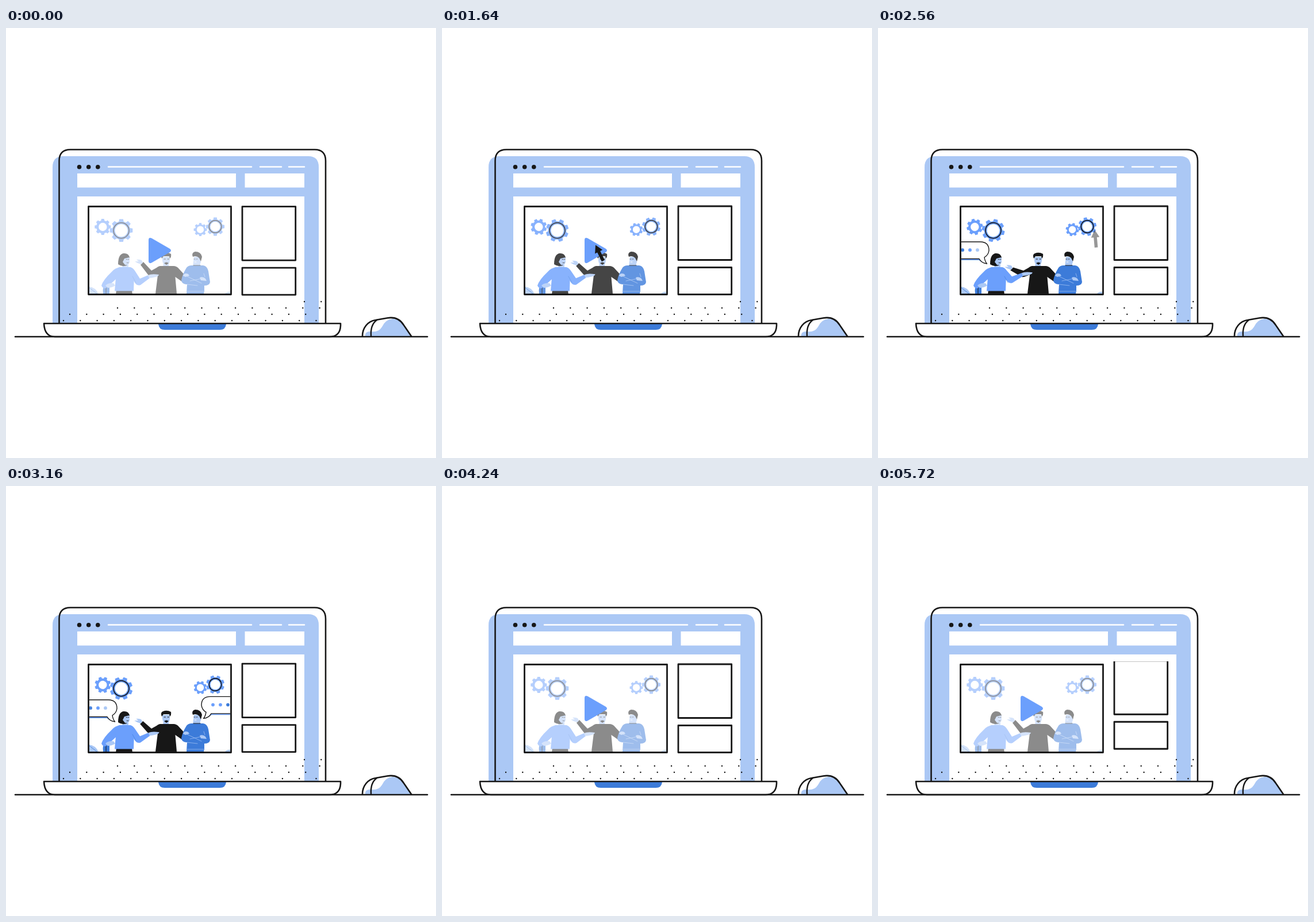
An HTML page with a canvas for the animation above (5.76 s loop, 748 by 748 pixels).

```html
<!DOCTYPE html>
<html lang="en">
<head>
<meta charset="utf-8">
<title>Laptop video</title>
<style>
  html, body { margin: 0; width: 100%; height: 100%; overflow: hidden; background: #fff; }
  canvas { display: block; width: 748px; height: 748px; }
</style>
</head>
<body>
<canvas id="stage" width="748" height="748"></canvas>
<script>
const ctx = document.getElementById('stage').getContext('2d');
const LOOP = 5760, STEP = 40;
const INK = '#171717', PALE = '#abc8f5', BLUE = '#6b9ffc', DEEP = '#3c7bd9', WHITE = '#fff';

const clamp = v => Math.min(1, Math.max(0, v));
const ramp = (t, a, b) => clamp((t - a) / (b - a));
const sine = u => (1 - Math.cos(Math.PI * u)) / 2;
const ease = (t, a, b) => sine(ramp(t, a, b));
const mix = (a, b, u) => a + (b - a) * u;

function fill(color, d) {
  ctx.fillStyle = color;
  ctx.fill(new Path2D(d));
}

function line(color, width, d) {
  ctx.strokeStyle = color;
  ctx.lineWidth = width;
  ctx.stroke(new Path2D(d));
}

function dot(x, y, r, color) {
  ctx.fillStyle = color;
  ctx.beginPath();
  ctx.arc(x, y, r, 0, Math.PI * 2);
  ctx.fill();
}

function box(x, y, w, h, color) {
  ctx.fillStyle = color;
  ctx.fillRect(x, y, w, h);
}

function frame(x, y, w, h) {
  ctx.strokeStyle = INK;
  ctx.lineWidth = 2.8;
  ctx.strokeRect(x, y, w, h);
}

function clipped(x, y, w, h, draw) {
  ctx.save();
  ctx.beginPath();
  ctx.rect(x, y, w, h);
  ctx.clip();
  draw();
  ctx.restore();
}

function drawLaptop() {
  fill(PALE, 'M81 514V242Q81 223 100 223H526Q544 223 544 242V514Z');
  for (const x of [127.5, 143.7, 159.8]) dot(x, 241.7, 3.8, INK);
  line(WHITE, 2.6, 'M178 241.5H427M442 241.5H479M492 241.5H519');
  box(124, 253, 276, 24.5, WHITE);
  box(415.5, 253, 103.5, 24.5, WHITE);
  box(124, 293, 395, 221, WHITE);
  line(INK, 2.6, 'M92.5 514V231Q92.5 211.5 112 211.5H537Q556 211.5 556 231V514');
}

function drawTexture() {
  const rows = [[519, 476], [194, 487], [111, 498], [100, 509]];
  for (const [start, y] of rows)
    for (let x = start; x < 550; x += 14.65 * (y === 476 ? 2 : 2)) dot(x, y, 1.2, INK);
}

function drawDesk() {
  fill(WHITE, 'M66 514H582V518Q581 537 563 537H85Q66 537 66 514Z');
  fill(DEEP, 'M265 515H383Q382 525 372 525H276Q266 525 265 515Z');
  line(INK, 2.6, 'M66 514H582V518Q581 537 563 537H85Q67 537 66 514Z');
  fill(PALE, 'M625 536Q624 527 635 528Q648 530 654 520Q660 507 672 506Q686 506 692 518L704 536Z');
  line(INK, 2.6, 'M620 536C620 522 629 510 643 508L663 504.5C677 502 686 507 692 517L705 536');
  line(INK, 2.4, 'M635 536C634 522 638 513 645 508');
  line(INK, 2.6, 'M16 537H733');
}

function drawGear(x, y, r, hole, ring, turn) {
  ctx.save();
  ctx.translate(x, y);
  ctx.rotate(turn);
  dot(0, 0, r * 0.8, BLUE);
  for (let i = 0; i < 8; i++) {
    ctx.rotate(Math.PI / 4);
    const w = r * 0.17;
    fill(BLUE, `M${-w * 1.3} ${-r * 0.7}L${-w} ${-r}H${w}L${w * 1.3} ${-r * 0.7}Z`);
  }
  dot(0, 0, hole, WHITE);
  if (ring) {
    ctx.strokeStyle = INK;
    ctx.lineWidth = 1.6;
    ctx.beginPath();
    ctx.arc(0, 0, ring, 0, Math.PI * 2);
    ctx.stroke();
  }
  ctx.restore();
}

function drawGears(turn) {
  drawGear(168.3, 346, 14, 7.2, 0, turn);
  drawGear(200.5, 352.2, 19.8, 11, 13.5, -turn);
  drawGear(338, 350.7, 11.4, 6.2, 0, -turn);
  drawGear(364, 345.5, 16, 8.5, 10.8, turn);
}

function drawWoman(g) {
  // bag and leaf beside her
  fill(PALE, 'M145 450Q155 451 161 462H145Z');
  line(DEEP, 0.8, 'M145 452L158 462');
  fill(DEEP, 'M169 462Q167 449 174 445H180V462Z');
  line(INK, 1, 'M174 462V448');
  fill(INK, 'M192 456H219L220 463H191Z');
  fill(BLUE, 'M199 416Q190 417 184 424Q169 438 166 448Q168 453 173 453L180 447L191 437Z');
  fill(PALE, 'M173 448Q178 443 187 444L190 448Q184 452 177 452Z');
  fill(PALE, 'M203 408H213V418H202Z');
  fill(BLUE, 'M197 416H216Q222 418 223 428L222 457.5H189L191 435Q188 420 197 416Z');
  // pointing arm
  const ex = 231, ey = 447 - 4 * g, hx = 249 + 3 * g, hy = 432 - 4 * g;
  fill(BLUE, `M215 416Q220 416 224 422L${ex + 2} ${ey - 11}L${hx - 2} ${hy - 2}L${hx + 1} ${hy + 3}L${ex + 3} ${ey}Q${ex - 3} ${ey + 2} ${ex - 7} ${ey - 4}L219 434Z`);
  fill(PALE, `M${hx - 2} ${hy - 2}Q${hx + 4} ${hy - 5} ${hx + 17} ${hy - 3}L${hx + 16} ${hy - 1}Q${hx + 11} ${hy + 2} ${hx} ${hy + 3}Z`);
  line(DEEP, 0.6, 'M220 432L226 443');
  fill(INK, 'M195 411Q195 394 204 392Q213 391 215 399L210 413Q202 416 195 411Z');
  fill(PALE, 'M206 401L214.5 399L215 407Q214 413 207 412L203 407Z');
  line(INK, 0.8, 'M209 402.5H211M212.5 402.5H214M210 408.5H213');
}

function drawSpeaker(g) {
  const hx = 237 - 4 * g, hy = 409 + 10 * g;
  fill(INK, 'M291 414Q297 414 301 419L312 431L306 441L293 432Z');
  fill(INK, `M270 414Q265 414 262 417L253 422L${hx + 2} ${hy - 2}L${hx - 3} ${hy + 3}L250 433Q254 434 264 429Z`);
  fill(PALE, `M${hx + 1} ${hy - 1}L${hx - 1} ${hy - 5}Q${hx - 6} ${hy - 7} ${hx - 10} ${hy - 6}L${hx - 6} ${hy - 3}L${hx - 13} ${hy - 3}L${hx - 8} ${hy}L${hx - 2} ${hy + 2}Z`);
  fill(PALE, 'M274 408H283V417H273Z');
  fill(INK, 'M268 414H292Q295 416 294 428L297 462H260L264 430Q262 416 268 414Z');
  fill(PALE, 'M272 398H285V405Q284 413 278 413Q273 412 272 405Z');
  fill(INK, 'M271 401Q268 394 273 392Q280 389 287 393Q288 398 285 401L284 397H274Z');
  line(INK, 1, 'M275 402H277.5M281 402H283.5');
  fill(INK, 'M275 409Q279 406 283 409L279 412Z');
}

function drawListener() {
  fill(PALE, 'M326 406H338V416H325Z');
  fill(DEEP, 'M323 413H343Q350 414 352 423L355 442Q354 448 345 448V458L344 462H314L315 446Q306 446 305 439Q307 428 314 417Q317 413 323 413Z');
  line(INK, 1, 'M326 413H338');
  fill(PALE, 'M308 431Q310 425 317 428L319 431L312 433Z');
  fill(PALE, 'M337 434Q343 432 347 436L349 440L339 439Z');
  line(PALE, 0.7, 'M315 432L340 444M320 440L340 436M315 446L333 448M344 427L346 433M315 458H345');
  fill(PALE, 'M327 398H338L339 408Q334 414 328 411Q325 408 327 398Z');
  fill(INK, 'M325 398Q322 391 329 389Q339 389 341 398L339 406L336 400Q331 395 325 398Z');
  line(INK, 0.8, 'M327 402H329M331 402H333');
  line(WHITE, 1, 'M328 407H331');
  fill(PALE, 'M381 462Q385 458 391 459V463Z');
}

function drawBubble(alpha, first, mirrored) {
  if (alpha <= 0) return;
  ctx.save();
  if (mirrored) {
    ctx.translate(533, -5.6);
    ctx.scale(-1, 1);
  }
  const size = mix(0.95, 1, alpha);
  ctx.globalAlpha = alpha;
  ctx.translate(145, 410);
  ctx.scale(size, size);
  ctx.translate(-145, -410);
  line(BLUE, 1.8, 'M135 403H176L180 406');
  const shape = 'M130 372H178Q193 372 193 387Q192 395 185 399Q186 406 189.5 410Q180 409 176 401.5H130Z';
  fill(WHITE, shape);
  line(INK, 1.4, shape);
  dot(147, 386.2, 2.9, DEEP);
  ctx.globalAlpha = alpha * first;
  dot(147, 386.2, 3, PALE);
  ctx.globalAlpha = alpha;
  dot(160, 386.2, 2.9, BLUE);
  dot(173, 386.2, 2.9, mirrored ? BLUE : PALE);
  ctx.restore();
}

function drawVideo(t) {
  const awake = Math.min(ease(t, 1320, 1880), 1 - ease(t, 3680, 4200));
  const gesture = Math.sin(Math.PI * ramp(t, 1320, 3480)) ** 2;
  const leaving = 1 - ease(t, 3680, 4160);
  clipped(145, 312, 245, 150, () => {
    drawGears(Math.PI * ramp(t, 1320, 4240));
    drawSpeaker(gesture);
    drawListener();
    drawWoman(gesture);
    box(145, 312, 245, 150, `rgba(255,255,255,${0.5 * (1 - awake)})`);
    drawBubble(Math.min(ease(t, 1880, 2320), leaving), ramp(t, 3120, 3520), false);
    drawBubble(Math.min(ease(t, 2680, 3120), leaving), 0, true);
    ctx.globalAlpha = Math.max(1 - ease(t, 2080, 2480), ease(t, 3720, 4200));
    fill(BLUE, 'M248 369Q248 363.5 253 365.5L285 384Q289 387 285 390L253 408.5Q248 410.5 248 405Z');
    ctx.globalAlpha = 1;
  });
  frame(143.5, 310.5, 248, 153);
}

// Two full card periods per scroll; the second scroll is cut by the loop.
function drawCards(t) {
  const period = 166.3, start = t < 5080 ? 3120 : 5120;
  const since = t - start;
  const scroll = since > 0 && since < 1120 ? 2 * period * sine(since / 1172) : 0;
  const settle = 0.6 * (1 - ramp(t, 600, 920));
  clipped(405, 305, 105, 163, () => {
    for (let i = 0; i < 4; i++) {
      const y = 310 + settle + i * period - scroll;
      frame(411, y, 92.7, 93.5);
      frame(411, y + 106.5, 92.7, 47);
    }
  });
}

function drawCursor(t) {
  if (t < STEP || t >= 2840) return;
  const enter = ease(t, 0, 920), leave = ease(t, 2240, 2840);
  const bend = (a, b, c) => (1 - enter) ** 2 * a + 2 * enter * (1 - enter) * b + enter ** 2 * c;
  const x = mix(bend(458, 297, 267), 466, leave);
  const y = mix(bend(485, 422, 377.5), 330, leave);
  ctx.save();
  ctx.globalAlpha = Math.min(1, enter * 1.5) * (1 - leave);
  ctx.translate(x, y);
  ctx.rotate(mix(-26, 12, leave) * Math.PI / 180);
  fill(INK, 'M0 0L7.3 13H2.8V30.5H-2.8V13H-7.3Z');
  ctx.restore();
}

function render(t) {
  box(0, 0, 748, 748, WHITE);
  ctx.lineCap = 'round';
  ctx.lineJoin = 'round';
  drawLaptop();
  drawTexture();
  drawVideo(t);
  drawCards(t);
  drawCursor(t);
  drawDesk();
}

const begin = performance.now();
function tick() {
  const t = (performance.now() - begin) % LOOP;
  render(Math.floor(t / STEP) * STEP);
  requestAnimationFrame(tick);
}
tick();
</script>
</body>
</html>
```
